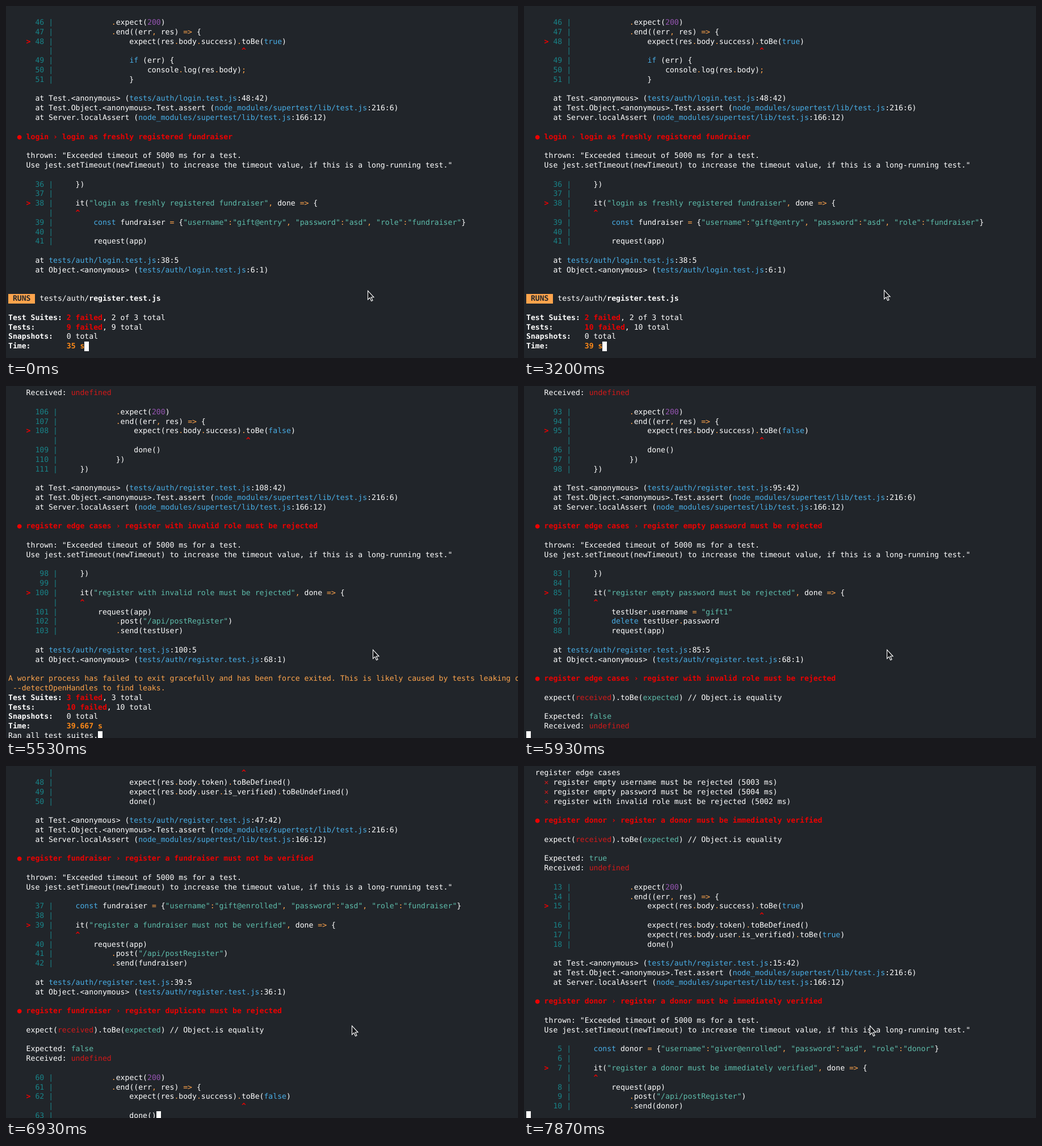
Recreate the animation shown at these times as an HTML page. Size 902 by 621 pixels, loop 8000 ms.

```html
<!DOCTYPE html>
<html lang="en">
<head>
<meta charset="utf-8">
<title>Test run in a terminal</title>
<style>
html, body { margin: 0; width: 100%; height: 100%; overflow: hidden; }
#stage { position: relative; width: 100%; height: 100%; overflow: hidden; contain: strict; background: #21252a; }
#screen {
  position: absolute; left: 4px; top: 5.3px; color: #fff; white-space: pre;
  font: 13.14px/16.81px "DejaVu Sans Mono", monospace; text-rendering: geometricPrecision;
}
#screen div { height: 16.81px; }
#pointer { position: absolute; left: 0; top: 0; }
b, i { font-style: normal; }
/* filled cells reach a little higher than the text line */
.cursor, .badge { display: inline-block; height: 15.51px; padding-top: 1.3px; margin-top: -1.3px; background: #fff; }
.badge { background: #fea44c; color: #21252a; font-weight: bold; }
.gutter { color: #198388; }
.red { color: #d41919; }
.fail { color: #ec0101; font-weight: bold; }
.green { color: #5ebdab; }
.yellow { color: #fea44c; }
.time { color: #ff8a18; font-weight: bold; }
.cyan { color: #49aee6; }
.purple { color: #9755b3; }
.frame { color: #8a8a8a; }
.dir { color: #0087af; }
.short { color: #8787af; }
.anchor { color: #00afff; font-weight: bold; }
.hash { color: #5fd700; }
</style>
</head>
<body>
<div id="stage">
  <div id="screen"></div>
  <svg id="pointer" width="14" height="21">
    <path d="M1.5 1.5V17L5 13.7L7.6 19.5L10 18.4L7.4 12.8H12Z" fill="#14161a" stroke="#fff" stroke-width="1.1"/>
  </svg>
</div>
<script>
const LOOP = 8000, ROWS = 37;
const $ = id => document.getElementById(id);
const ink = (cls, text) => `<i class="${cls}">${text}</i>`;
const bold = text => `<b>${text}</b>`;

// Syntax colours
const TOKENS = /("[^"]*")|\b(const|delete|if|true|false)\b|\b(\d+)\b|(=>|[.,;:=])/g;
const highlight = code => code.replace(TOKENS, (all, str, word, num) =>
  ink(str ? 'green' : word ? 'cyan' : num ? 'purple' : 'yellow', all));

// Code excerpt around line n: two lines before, three after
function excerpt(n, col, lineAt) {
  const width = String(n + 3).length, rows = [];
  for (let k = n - 2; k <= n + 3; k++) {
    const mark = k === n ? ink('fail', '>') : ' ';
    rows.push(`    ${mark} ${ink('gutter', String(k).padStart(width) + ' |')} ${highlight(lineAt(k))}`);
    if (k === n) rows.push(' '.repeat(7 + width) + ink('gutter', '|') + ' '.repeat(col) + ink('fail', '^'));
  }
  return rows;
}

const at = (who, path, pos) => who
  ? `      at ${who} (${ink('cyan', path)}:${pos})`
  : `      at ${ink('cyan', path)}:${pos}`;
const ANON = '&lt;anonymous>', LIB = 'node_modules/supertest/lib/test.js';
const assertTrace = (path, n) => [
  at(`Test.${ANON}`, path, n + ':42'),
  at(`Test.Object.${ANON}.Test.assert`, LIB, '216:6'),
  at('Server.localAssert', LIB, '166:12'), ''];
const timeoutTrace = (path, n, suiteLine) => [
  at('', path, n + ':5'), at(`Object.${ANON}`, path, suiteLine + ':1'), ''];
const heading = (suite, name) => [ink('fail', `  ● ${suite} › ${name}`), ''];
const THROWN = [
  '    thrown: "Exceeded timeout of 5000 ms for a test.',
  '    Use jest.setTimeout(newTimeout) to increase the timeout value, if this is a long-running test."', ''];

const summary = (suites, suitesTotal, tests, time) => [
  bold('Test Suites: ') + ink('fail', suites + ' failed') + `, ${suitesTotal} total`,
  bold('Tests:       ') + ink('fail', tests + ' failed') + `, ${tests} total`,
  bold('Snapshots:   ') + '0 total',
  bold('Time:        ') + ink('time', time + ' s')];

// First screen: the login suite
const pad = (n, text) => ' '.repeat(n) + text;
const success = value => pad(16, `expect(res.body.success).toBe(${value})`);
const EXPECT = pad(12, '.expect(200)'), END = pad(12, '.end((err, res) => {');
const pick = (first, lines) => k => lines[k - first];
const LOGIN = 'tests/auth/login.test.js', REGISTER = 'tests/auth/register.test.js';
const freshLogin = 'login as freshly registered fundraiser';
const loginScreen = [
  '',
  ...excerpt(48, 42, pick(46, [EXPECT, END, success(true), pad(16, 'if (err) {'),
    pad(20, 'console.log(res.body);'), pad(16, '}')])), '',
  ...assertTrace(LOGIN, 48),
  ...heading('login', freshLogin), ...THROWN,
  ...excerpt(38, 5, pick(36, ['    })', '', `    it("${freshLogin}", done => {`,
    pad(8, 'const fundraiser = {"username":"gift@entry", "password":"asd", "role":"fundraiser"}'),
    '', pad(8, 'request(app)')])), '',
  ...timeoutTrace(LOGIN, 38, 6), '',
  ink('badge', ' RUNS ') + ' tests/auth/' + bold('register.test.js'), ''];

// The register suite: its source lines by number, then its report
const source = {};
const put = (n, ...lines) => lines.forEach((line, k) => source[n + k] = line);
const user = (n, name, login, role) =>
  put(n, `    const ${name} = {"username":"${login}", "password":"asd", "role":"${role}"}`);
const report = [];

function addTest(n, suiteLine, suite, name, who, value, prep = [], checks = []) {
  put(n, `    it("${name}", done => {`, ...prep.map(p => pad(8, p)), pad(8, 'request(app)'),
    pad(12, '.post("/api/postRegister")'), pad(12, `.send(${who})`), '', '',
    EXPECT, END, success(value), ...checks.map(c => pad(16, c)),
    pad(16, 'done()'), pad(12, '})'), '    })');
  const lineAt = k => source[k] || '', bad = n + prep.length + 8;
  report.push(() => [
    ...heading(suite, name),
    `    expect(${ink('red', 'received')}).toBe(${ink('green', 'expected')}) // Object.is equality`, '',
    '    Expected: ' + ink('green', value),
    '    Received: ' + ink('red', 'undefined'), '',
    ...excerpt(bad, 42, lineAt), '', ...assertTrace(REGISTER, bad),
    ...heading(suite, name), ...THROWN,
    ...excerpt(n, 5, lineAt), '', ...timeoutTrace(REGISTER, n, suiteLine)]);
}

const DONOR = 'register donor', FUND = 'register fundraiser', EDGE = 'register edge cases';
const duplicate = 'register duplicate must be rejected';
const edgeNames = ['empty username', 'empty password', 'with invalid role']
  .map(what => `register ${what} must be rejected`);
const token = 'expect(res.body.token).toBeDefined()', verified = 'expect(res.body.user.is_verified)';
user(5, 'donor', 'giver@enrolled', 'donor');
user(37, 'fundraiser', 'gift@enrolled', 'fundraiser');
user(69, 'testUser', 'gift1', 'qwe');
addTest(7, 4, DONOR, 'register a donor must be immediately verified', 'donor', true, [],
  [token, verified + '.toBe(true)']);
addTest(22, 4, DONOR, duplicate, 'donor', false);
addTest(39, 36, FUND, 'register a fundraiser must not be verified', 'fundraiser', true, [],
  [token, verified + '.toBeUndefined()']);
addTest(54, 36, FUND, duplicate, 'fundraiser', false);
addTest(71, 68, EDGE, edgeNames[0], 'testUser', false, ['delete testUser.username']);
addTest(85, 68, EDGE, edgeNames[1], 'testUser', false,
  ['testUser.username = "gift1"', 'delete testUser.password']);
addTest(100, 68, EDGE, edgeNames[2], 'testUser', false);

const npm = (key, text) => `npm ${ink('red', 'ERR!')} ${key && ink('purple', key) + ' '}${text}`;
const PROJECT = 'playground/coding/events/compfest-sea-2021/event/project-akhir/';
const errors = [
  '  ' + EDGE,
  ...edgeNames.map((name, k) => `    ${ink('red', '✕')} ${name} (${[5003, 5004, 5002][k]} ms)`), '',
  ...report.flatMap(make => make())];
const log = [
  ...errors,
  ink('yellow', 'A worker process has failed to exit gracefully and has been force exited. This is likely caused by tests leaking due to improper teardown. Try running with'),
  ink('yellow', ' --detectOpenHandles to find leaks.'),
  ...summary(3, 3, 10, '39.667'),
  'Ran all test suites.',
  npm('code', '1'),
  npm('path', `/home/marlo/Documents/${PROJECT}backend`),
  npm('', 'command failed'),
  npm('command', 'sh -c npm run db-init; jest --silent=false'), '',
  npm('', 'A complete log of this run can be found in:'),
  npm('', '    /home/marlo/.npm/_logs/2021-08-20T14_40_55_511Z-debug.log'), '',
  ink('frame', '╭─ ') + ink('anchor', '~') + ink('dir', '/') + ink('short', 'Doc') +
    ink('dir', '/' + PROJECT) + ink('anchor', 'backend') + ' @' + ink('hash', 'ea43fed1'),
  ink('frame', '╰─') + ink('fail', '❯') + ' ' + ink('red', 's')];

// Wheel steps and the lines scrolled back after a number of them
const run = (from, to, n) => Array.from({ length: n }, (_, k) => from + (to - from) * k / (n - 1));
const wheel = [...run(5530, 6330, 13), ...run(6400, 6730, 6), ...run(6870, 6930, 2), ...run(7070, 7870, 11)];
const scrollKeys = [[0, 0], [1, 10], [12, 70], [21, 145], [32, 230]];
function scrolled(t) {
  const n = wheel.filter(w => w <= t).length;
  const k = Math.max(1, scrollKeys.findIndex(key => key[0] >= n));
  const [a, from] = scrollKeys[k - 1], [b, to] = scrollKeys[k];
  return 5 * Math.round((from + (to - from) * (n - a) / (b - a)) / 5);
}

// [time, lines printed so far]
const printed = [[3270, 120], [3330, 200], [3800, 257], [3870, 261], [3930, 264], [4000, 267]];
const pointerPath = [
  [0, 637, 501], [1000, 636, 501], [1070, 634, 500],
  [5130, 650, 482], [5200, 678, 454], [5270, 688, 443], [5330, 664, 455],
  [5530, 646, 464], [5800, 639, 464], [6000, 632, 463], [6260, 625, 463],
  [6500, 618, 461], [6730, 612, 458], [6930, 609, 457]];
const latest = (keys, t) => keys.filter(key => key[0] <= t).pop();

function linesAt(t) {
  if (t < 3270) {
    const late = t >= 3200;
    const seconds = late ? 39 : 35 + Math.floor((t + 730) / 1000);
    return [...loginScreen, ...summary(2, '2 of 3', late ? 10 : 9, seconds)];
  }
  if (t >= 3400 && t < 3800) return [...errors, '', ...summary(3, 3, 10, 39)];
  return log.slice(0, latest(printed, t)[1] - scrolled(t));
}

let shown = '';
function draw(now) {
  const t = now % LOOP;
  const html = linesAt(t).slice(-ROWS).map(line => `<div>${line}</div>`).join('')
    .replace(/<\/div>$/, ink('cursor', ' ') + '</div>');
  if (html !== shown) $('screen').innerHTML = shown = html;
  const [, x, y] = latest(pointerPath, t);
  $('pointer').style.transform = `translate(${x - 1}px, ${y}px)`;
  requestAnimationFrame(draw);
}
requestAnimationFrame(draw);
</script>
</body>
</html>
```
